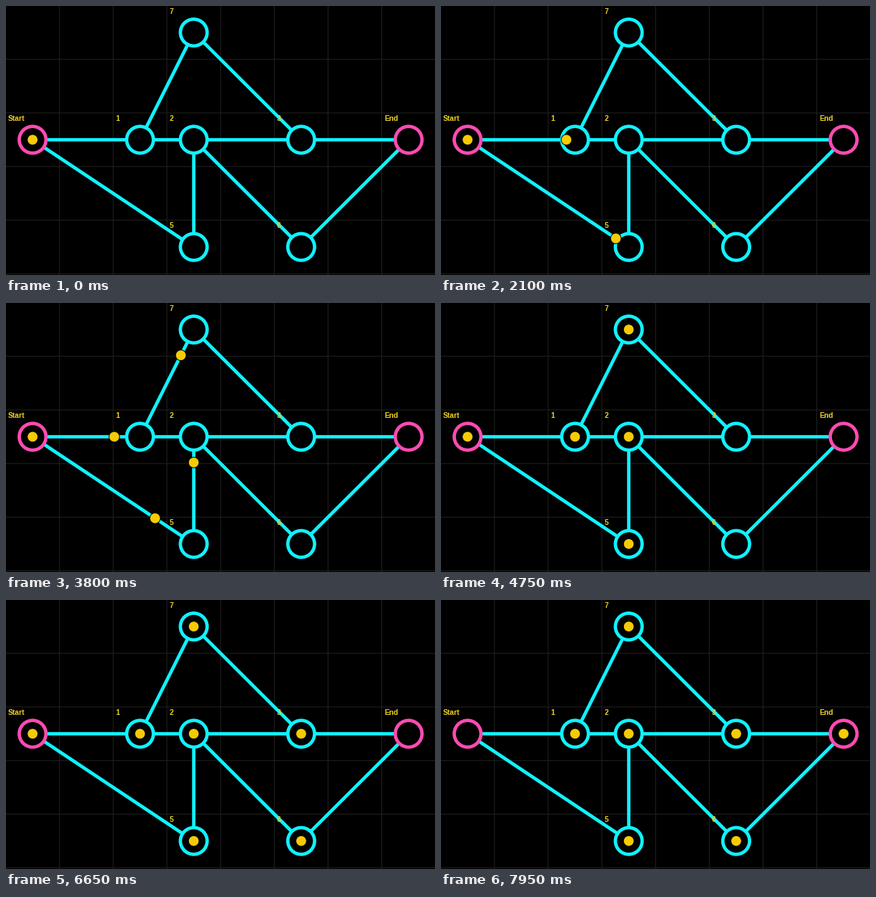
Animation, 600 px wide and 377 px high, one loop 8000 ms. Source, as a matplotlib script:

```python
import matplotlib.pyplot as plt
from matplotlib.animation import FuncAnimation
from matplotlib.patches import Circle

W, H, DPI = 600, 377, 100
PX = 72 / DPI                      # points per pixel
CELL, HALF = 75.13, 37.2

CYAN, PINK = "#10f2ff", "#ff4bb2"
GOLD, LABEL, GRID = "#f6cb05", "#ecd022", "#1e1e1e"
STROKE = 4.7

FRAMES, INTERVAL = 160, 50
TICKS_PER_FRAME = 3                # 60 ticks per second
FIRST_MOVE, MOVE, CYCLE = 80, 50, 110

# room name -> grid cell
ROOMS = {"Start": (0, 2), "1": (2, 2), "2": (3, 2), "3": (5, 2),
         "End": (7, 2), "5": (3, 4), "6": (5, 4), "7": (3, 0)}
TUNNELS = [("Start", "1"), ("1", "2"), ("2", "3"), ("3", "End"),
           ("Start", "5"), ("5", "2"), ("1", "7"), ("7", "3"),
           ("2", "6"), ("6", "End")]
ROUTES = [("Start", "1", "7", "3", "End"), ("Start", "5", "2", "6", "End")]
WAVES = 4


def center(room):
    col, row = ROOMS[room]
    return HALF + col * CELL, HALF + row * CELL


fig = plt.figure(figsize=(W / DPI, H / DPI), dpi=DPI, facecolor="black")
ax = fig.add_axes([0, 0, 1, 1])
ax.set_xlim(0, W)
ax.set_ylim(H, 0)
ax.axis("off")


def line(xs, ys, color, width, z):
    ax.plot(xs, ys, color=color, lw=width * PX, zorder=z, snap=False)


for k in range(1, 8):
    edge = HALF + (k - 0.5) * CELL
    line([edge, edge], [0, H], GRID, 1.2, 1)
    if edge < H:
        line([0, W], [edge, edge], GRID, 1.2, 1)

for a, b in TUNNELS:
    (xa, ya), (xb, yb) = center(a), center(b)
    line([xa, xb], [ya, yb], CYAN, STROKE, 2)

for name in ROOMS:
    x, y = center(name)
    color = PINK if name in ("Start", "End") else CYAN
    ax.add_patch(Circle((x, y), 18.7, fc="black", ec=color,
                        lw=STROKE * PX, zorder=3))
    ax.text(x - 34.2, y - 26.6, name, color=LABEL, family="Liberation Sans",
            weight="bold", size=10.2 * PX, ha="left", va="baseline", zorder=4)

ants = []
for route in ROUTES:
    for wave in range(WAVES):
        dot = Circle(center("Start"), 7.4, fc=GOLD, ec="black",
                     lw=PX, zorder=5)
        ax.add_patch(dot)
        ants.append((dot, route, wave))


def rounds_done(frame):
    tick = frame * TICKS_PER_FRAME - FIRST_MOVE
    if tick < 0:
        return 0.0
    turn, phase = divmod(tick, CYCLE)
    return turn + min(phase / MOVE, 1.0)


def update(frame):
    done = rounds_done(frame)
    for dot, route, wave in ants:
        pos = min(max(done - wave, 0), len(route) - 1)
        i = min(int(pos), len(route) - 2)
        f = pos - i
        (xa, ya), (xb, yb) = center(route[i]), center(route[i + 1])
        dot.center = (xa + (xb - xa) * f, ya + (yb - ya) * f)
    return [dot for dot, _, _ in ants]


anim = FuncAnimation(fig, update, frames=FRAMES, interval=INTERVAL,
                     repeat=True, repeat_delay=0, blit=False)
plt.show()
```
